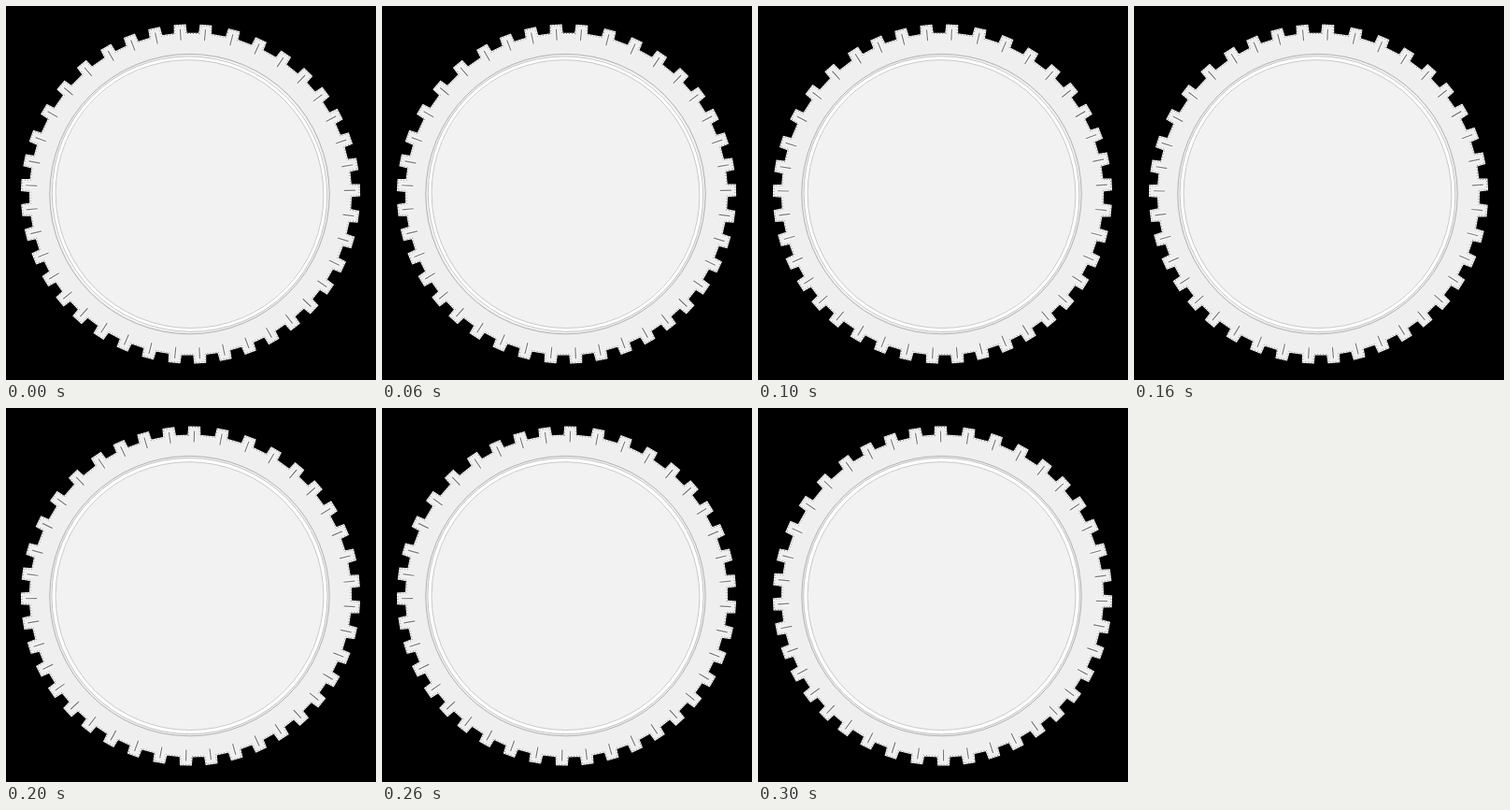
Animation of 396x400 px, one loop 400 ms. Source, as an HTML page with a canvas:

```html
<!DOCTYPE html>
<html lang="en">
<head>
<meta charset="utf-8">
<title>Turning gear</title>
<style>
  html, body { margin: 0; width: 100%; height: 100%; overflow: hidden; background: #000; }
  canvas { display: block; }
</style>
</head>
<body>
<canvas id="stage" width="396" height="400"></canvas>
<script>
const ctx = document.getElementById('stage').getContext('2d');
const TAU = Math.PI * 2, DEG = Math.PI / 180;
const CX = 197.5, CY = 201;
const VALLEY = 171.5, TIP = 180.5, HALF = 5.5;
const STEP_MS = 100, STEPS = 4, TURN = 1.95;

// The hand-cut teeth are unevenly spaced: degrees clockwise from the top, one per group.
const GROUP = 4;
const groupStarts = [5.2, 44, 79.8, 115.6, 150.5, 185.5, 222, 256, 290, 330];
const teeth = groupStarts.flatMap((start, i) => {
  const end = groupStarts[i + 1] ?? groupStarts[0] + 360;
  return Array.from({ length: GROUP }, (_, k) => start + (end - start) * k / GROUP);
});

// Point at radius r along a clockwise-from-top angle, shifted sideways.
const point = (angle, r, side) => [
  CX + Math.sin(angle) * r + Math.cos(angle) * side,
  CY - Math.cos(angle) * r + Math.sin(angle) * side
];

function gearPath(angles) {
  const path = new Path2D();
  for (const a of angles) {
    path.lineTo(...point(a, VALLEY, -HALF - 0.5));
    path.lineTo(...point(a, TIP, -HALF));
    path.lineTo(...point(a, TIP, HALF));
    path.lineTo(...point(a, VALLEY, HALF + 0.5));
  }
  path.closePath();
  return path;
}

function stroke(path, color, width, dash = []) {
  ctx.strokeStyle = color;
  ctx.lineWidth = width;
  ctx.setLineDash(dash);
  ctx.stroke(path);
}

function ellipse(rx, ry = rx, tilt = 0) {
  const path = new Path2D();
  path.ellipse(196.5, 201.1, rx, ry, tilt, 0, TAU);
  return path;
}

function drawRim(step) {
  const wobble = 1.2 - 0.4 * step;
  const tilt = 45 * DEG;
  const disc = ellipse(145.5);
  ctx.fillStyle = '#f2f2f2';
  ctx.fill(disc);
  stroke(disc, '#fff', 5);
  stroke(ellipse(149.7), '#aaa', 0.9);
  stroke(ellipse(147.8, 147.8 - wobble, tilt), '#b4b4b4', 0.8);
  stroke(ellipse(143.4 + wobble / 2, 143.4 - wobble / 2, tilt), '#bababa', 0.8);
}

function draw(step) {
  ctx.fillStyle = '#000';
  ctx.fillRect(0, 0, 396, 400);

  const angles = teeth.map(degrees => (degrees - TURN * step) * DEG);
  const gear = gearPath(angles);
  stroke(gear, '#fff', 2);
  ctx.fillStyle = '#efefef';
  ctx.fill(gear);
  stroke(gear, '#777', 0.9, [1, 2]);

  const slits = new Path2D();
  for (const a of angles) {
    slits.moveTo(...point(a, 164.5, 0));
    slits.lineTo(...point(a, 176.5, 0));
  }
  stroke(slits, '#fff', 3);
  stroke(slits, '#777', 1.2);
  drawRim(step);
}

let shown = -1;
function tick() {
  const step = Math.floor(performance.now() / STEP_MS) % STEPS;
  if (step !== shown) draw(shown = step);
  requestAnimationFrame(tick);
}
tick();
</script>
</body>
</html>
```
